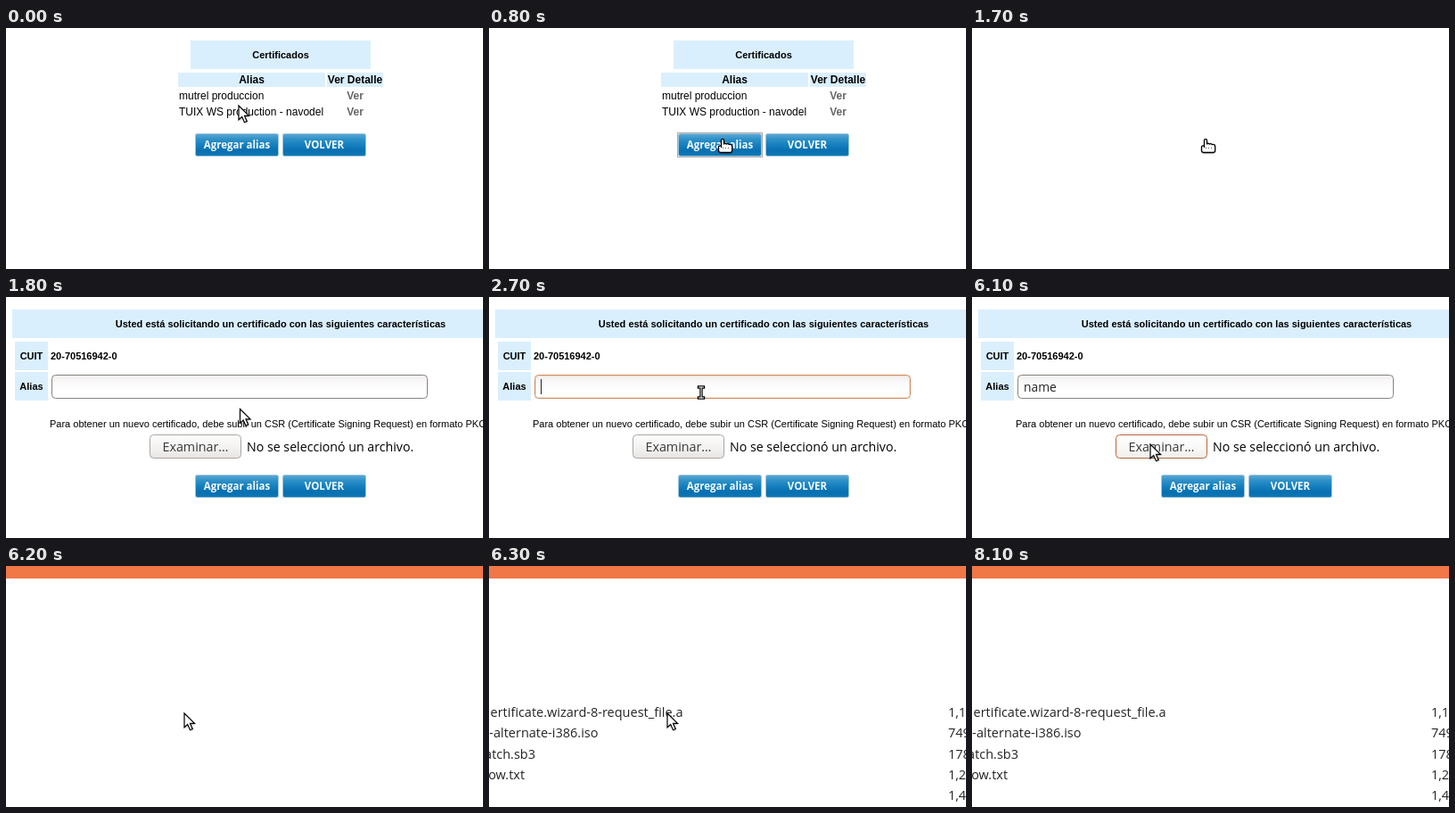
Animation, 535 px wide and 270 px high, one loop 8.4 s. Source, as an HTML page with a canvas:

```html
<!DOCTYPE html>
<html lang="es">
<head>
<meta charset="utf-8">
<title>Certificados</title>
<style>
html, body { margin: 0; width: 100%; height: 100%; overflow: hidden; background: #fff; }
canvas { display: block; width: 535px; height: 270px; }
</style>
</head>
<body>
<canvas id="stage" width="535" height="270"></canvas>
<script>
const LOOP = 8400;
const SANS = '"Liberation Sans", Arial, sans-serif';
const UI = '"Open Sans", "Noto Sans", sans-serif';
const PALE = '#daeffd';
const INK = '#242424';
const ctx = document.getElementById('stage').getContext('2d');

// Pointer poses: start time, hotspot x, y, shape
const pointer = [
  [0, 260.5, 86.5, 'arrow'],
  [100, 263, 84, 'arrow'],
  [200, 264.5, 83, 'arrow'],
  [400, 264, 88, 'arrow'],
  [500, 263, 103, 'arrow'],
  [600, 262, 120, 'hand'],
  [700, 262, 124, 'hand'],
  [1800, 262, 125, 'arrow'],
  [2300, 257, 119, 'arrow'],
  [2400, 245, 109, 'beam'],
  [2500, 238, 107, 'beam'],
  [3900, 238, 105, 'beam'],
  [5300, 232, 118, 'arrow'],
  [5400, 221, 143, 'arrow'],
  [5500, 214, 157, 'arrow'],
  [5700, 194, 165, 'arrow'],
  [6000, 199.5, 164.5, 'arrow'],
  [7700, 191, 155, 'arrow'],
  [7800, 165, 121, 'arrow'],
  [7900, 122, 66, 'arrow'],
  [8000, 82, 15, 'arrow'],
  [8100, 0, 0, 'none']
];

const between = (t, a, b) => t >= a && t < b;

function box(x, y, w, h, fill) {
  ctx.fillStyle = fill;
  ctx.fillRect(x, y, w, h);
}

function text(str, x, y, font, color = '#000', align = 'left') {
  ctx.font = font;
  ctx.fillStyle = color;
  ctx.textAlign = align;
  ctx.fillText(str, x, y);
}

function fade(y, h, colors) {
  const g = ctx.createLinearGradient(0, y, 0, y + h);
  colors.forEach((c, i) => g.addColorStop(i / (colors.length - 1), c));
  return g;
}

function panel(x, y, w, h, r, fill, border) {
  ctx.beginPath();
  ctx.roundRect(x + 0.5, y + 0.5, w - 1, h - 1, r);
  ctx.fillStyle = fill;
  ctx.fill();
  ctx.strokeStyle = border;
  ctx.lineWidth = 1;
  ctx.stroke();
}

function blueButton(label, x, y, w) {
  panel(x, y, w, 26, 2, fade(y, 26, ['#62abd6', '#2f91c8', '#1580be', '#0870b0', '#0f79b7']), '#9fc4db');
  text(label, x + w / 2, y + 17, 'bold 11.5px ' + UI, '#f4f9fc', 'center');
}

function buttons(y) {
  blueButton('Agregar alias', 212, y, 94);
  blueButton('VOLVER', 310, y, 94);
}

function listPage(t) {
  const bold = 'bold 12px ' + SANS, plain = '12px ' + SANS;
  box(207, 14, 202, 32, PALE);
  box(193, 50, 165, 16, PALE);
  box(360, 50, 63, 16, PALE);
  text('Certificados', 308, 34, 'bold 11px ' + SANS, '#000', 'center');
  text('Alias', 275.5, 62, bold, '#000', 'center');
  text('Ver Detalle', 391.5, 62, bold, '#000', 'center');
  text('mutrel produccion', 194, 80, plain);
  text('TUIX WS production - navodel', 194, 98, plain);
  for (const y of [80, 98]) text('Ver', 391.5, y, bold, '#666', 'center');
  buttons(118);
  if (t >= 800) {
    ctx.setLineDash([1, 1]);
    ctx.strokeStyle = '#555';
    ctx.lineWidth = 1;
    ctx.strokeRect(211.5, 117.5, 95, 27);
    ctx.setLineDash([]);
  }
}

function aliasField(t) {
  const focus = between(t, 2600, 6000);
  panel(51, 87, 422, 27, 4, fade(87, 27, ['#efedeb', '#fbfafa', '#ffffff', '#ffffff']),
    focus ? '#cf8a5e' : '#88837e');
  if (focus) {
    ctx.beginPath();
    ctx.roundRect(52.5, 88.5, 419, 24, 3);
    ctx.strokeStyle = 'rgba(240,170,120,.3)';
    ctx.stroke();
  }
  const typed = t >= 3100;
  if (typed) text('name', 58, 106, '13.8px ' + UI, INK);
  const caret = between(t, 2600, 3800) || between(t, 5000, 5100);
  if (caret) box(typed ? 95 : 58, 92, 1, 17, '#222');
}

function formPage(t) {
  const bold = 'bold 11px ' + SANS;
  box(7, 14, 528, 32, PALE);
  box(10, 50, 37, 32, PALE);
  box(10, 84, 37, 32, PALE);
  text('Usted está solicitando un certificado con las siguientes características',
    308, 34, bold, '#000', 'center');
  text('CUIT', 28.5, 70, bold, '#000', 'center');
  text('20-70516942-0', 50, 70, bold);
  text('Alias', 28.5, 104, bold, '#000', 'center');
  aliasField(t);
  text('Para obtener un nuevo certificado, debe subir un CSR (Certificate Signing Request) en formato PKCS#10',
    49, 146, '11px ' + SANS);
  const hover = t >= 5500;
  panel(161, 154, 103, 27, 4,
    fade(154, 27, hover ? ['#ffffff', '#faf9f9', '#efeeec'] : ['#fdfdfd', '#f4f3f2', '#e7e5e3']),
    t >= 6000 ? '#b5673a' : '#aaa5a0');
  text('Examinar…', 212.5, 173, '14.3px ' + UI, '#383838', 'center');
  text('No se seleccionó un archivo.', 270, 173, '14.2px ' + UI);
  buttons(199);
}

function fileDialog(t) {
  box(0, 0, 535, 14, '#f07746');
  if (t < 6300) return;
  const font = '14.5px ' + UI;
  const rows = [
    ['ertificate.wizard-8-request_file.a', 217.5, '1,1'],
    ['4-alternate-i386.iso', 122.5, '749'],
    ['Scratch.sb3', 52, '178'],
    ['ow.txt', 40, '1,2'],
    ['', 0, '1,4']
  ];
  rows.forEach(([name, right, size], i) => {
    const y = Math.round(169 + i * 23.3);
    text(name, right, y, font, INK, 'right');
    text(size, 515, y, font, INK);
  });
}

const shapes = {
  none() {},
  arrow() {
    const p = new Path2D('M0.5 0.5V16.3L4.2 12.9L7 19.2L9.7 18L7 11.9H12Z');
    ctx.shadowColor = 'rgba(0,0,0,.35)';
    ctx.shadowBlur = 2;
    ctx.shadowOffsetX = ctx.shadowOffsetY = 1;
    ctx.fillStyle = '#fff';
    ctx.fill(p);
    ctx.shadowColor = 'transparent';
    ctx.strokeStyle = '#000';
    ctx.lineWidth = 1.2;
    ctx.stroke(p);
  },
  hand() {
    const p = new Path2D('M-1.5 10V2Q-1.5 .5 0 .5T1.5 2V6Q2.5 4.5 4.3 6Q6 4.9 7.3 6.6' +
      'Q10.7 5.7 10.7 9V13Q10.7 15.5 8.5 15.5H-2Q-4.5 15.5-4.5 13V9.5Q-4.5 7.5-1.5 8');
    ctx.shadowColor = 'rgba(0,0,0,.3)';
    ctx.shadowBlur = 2;
    ctx.shadowOffsetY = 1;
    ctx.fillStyle = '#fff';
    ctx.fill(p);
    ctx.shadowColor = 'transparent';
    ctx.strokeStyle = '#000';
    ctx.lineWidth = 1.3;
    ctx.lineJoin = 'round';
    ctx.stroke(p);
    for (const x of [0, 3, 6]) box(x, 10, 1, 1, '#555');
  },
  beam() {
    const p = new Path2D('M-2.5 -6H2.5M0 -6V6M-2.5 6H2.5');
    ctx.lineCap = 'square';
    for (const [color, width] of [['#000', 3.4], ['#fff', 1]]) {
      ctx.strokeStyle = color;
      ctx.lineWidth = width;
      ctx.stroke(p);
    }
  }
};

function drawPointer(t) {
  const [, x, y, shape] = pointer.findLast(k => k[0] <= t);
  ctx.save();
  ctx.translate(x, y);
  shapes[shape]();
  ctx.restore();
}

function draw(t) {
  box(0, 0, 535, 270, '#fff');
  if (t < 1700) listPage(t);
  else if (between(t, 1800, 6200)) formPage(t);
  else if (t >= 6200) fileDialog(t);
  drawPointer(t);
}

const start = performance.now();
function tick() {
  draw((performance.now() - start) % LOOP);
  requestAnimationFrame(tick);
}
tick();
</script>
</body>
</html>
```
